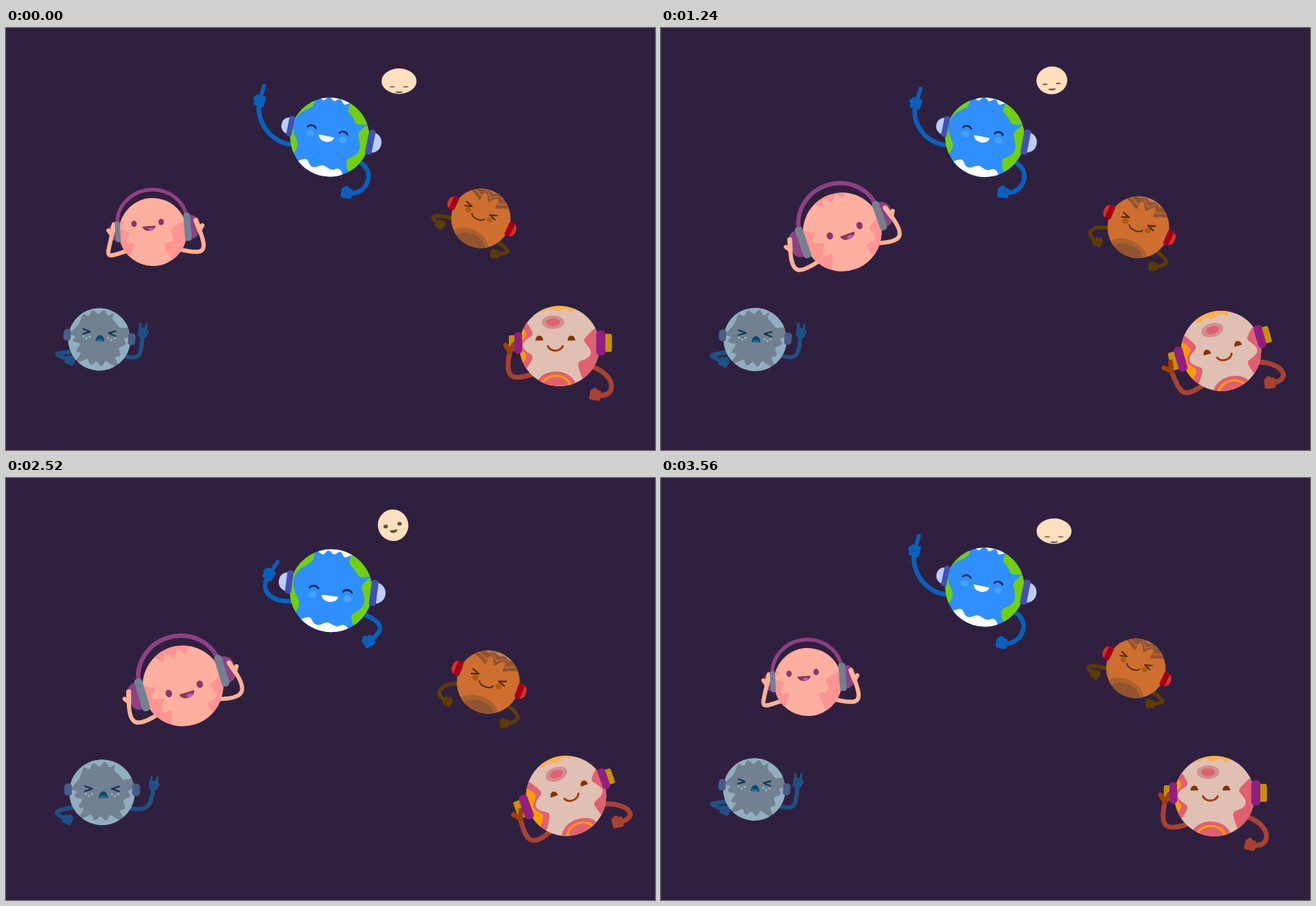
An HTML page with a canvas that plays this animation: 928 by 603 pixels, repeating every 3600 ms.

```html
<!DOCTYPE html>
<html lang="en">
<head>
<meta charset="utf-8">
<title>Dancing planets</title>
<style>
html, body { margin: 0; width: 100%; height: 100%; overflow: hidden; background: #302040; }
canvas { display: block; }
</style>
</head>
<body>
<canvas id="stage" width="928" height="603"></canvas>
<script>
const c = document.getElementById('stage').getContext('2d');
const { PI, sin, cos, min, max, abs, sqrt, exp } = Math;
const RAD = PI / 180;
c.lineCap = c.lineJoin = 'round';

// ---- Shapes ----
function fill(color, draw) { c.fillStyle = color; c.beginPath(); draw(); c.fill(); }
function stroke(color, width, draw) {
  c.strokeStyle = color; c.lineWidth = width; c.beginPath(); draw(); c.stroke();
}
function oval(color, x, y, rx, ry = rx, from = 0, to = 360) {
  fill(color, () => c.ellipse(x, y, rx, ry, 0, from * RAD, to * RAD));
}
function bar(color, x, y, w, h, r) { fill(color, () => c.roundRect(x, y, w, h, r)); }
function line(color, width, ...p) {
  stroke(color, width, () => { for (let i = 0; i < p.length; i += 2) c.lineTo(p[i], p[i + 1]); });
}
function within(x, y, angle, draw) {
  c.save(); c.translate(x, y); c.rotate(angle); draw(); c.restore();
}
function turn(x, y, degrees) {
  const s = sin(degrees * RAD), k = cos(degrees * RAD);
  return [x * k - y * s, x * s + y * k];
}

// A patch along the edge of the unit disc with a wavy inner border.
function rim(color, angle, half, depth, waves = 0, phase = 0) {
  fill(color, () => {
    c.arc(0, 0, 1.4, (angle - half) * RAD, (angle + half) * RAD);
    for (let u = 1; u > -1.01; u -= .05) {
      const r = 1 - depth * (1 + .4 * cos(waves * PI * u + phase)) * (1 - u ** 8);
      const a = (angle + half * u) * RAD;
      c.lineTo(r * cos(a), r * sin(a));
    }
  });
}

// ---- Hands, pointing along +x ----
function fist(color) {
  bar(color, -8, -7.5, 16, 15, 3);
  bar(color, -2, 3, 7, 7, 3);
}
const hands = {
  fist,
  point(color) { fist(color); line(color, 5.5, 4, 0, 22, 0); },
  horns(color) { fist(color); line(color, 4, 4, -5, 14, -5); line(color, 4, 4, 5, 14, 5); },
  touch(color) { line(color, 7, 0, 0, 15, 0); line(color, 6, 0, 0, 5, 6); },
  fork(color) { line(color, 7, 0, 0, 12, -4); line(color, 7, 0, 0, 8, 8); }
};

// ---- Face parts ----
function pair(dx, draw) {
  for (const side of [-1, 1]) { c.save(); c.translate(side * dx, 0); c.scale(side, 1); draw(); c.restore(); }
}
function squint(color, dx, size) {
  pair(dx, () => line(color, 2.5, size, -size * .7, -size, 0, size, size * .7));
}
function smile(color, y, rx, ry, width) {
  stroke(color, width, () => c.ellipse(0, y, rx, ry, 0, .08 * PI, .92 * PI));
}

// ---- Timing ----
const BEAT = 29;
const ease = u => (1 - cos(PI * max(0, min(1, u)))) / 2;
const lift = u => u * (1.4 - .4 * u);
// Swings from 1 to -1 in ten steps, waits, and is back at 1 when the beat ends.
const swing = (t, back) => 1 - 2 * (t < back ? ease(t / 10) : 1 - ease((t - back) / (BEAT - back)));

// pose(): body centre, radii, tilt, face offset, and for each hand x, y and direction.
const planets = [
  { // pink
    frames: 90, size: 60, ref: 1, rest: 6, pitch: .6, attached: true,
    body: '#ffaf9f', arm: '#ffb294', width: 6, reach: 34, shoulders: [148, 37], kinds: ['touch', 'touch'],
    cup: ['#8e4184', 21, 42, 16], pad: ['#738092', 12, 50], band: '#8e4184',
    pose(t) {
      const u = min(t, 89 - t) / 44.5, arc = sin(PI * u), e = lift(u), r = 48.5 + 9.5 * arc;
      const fx = -7.5 + 14 * e;
      return {
        x: 210 + 63 * e, y: 291.5 - 23 * e + 22 * arc, rx: r, ry: r, tilt: -4 - 22 * u,
        fx, fy: -13 - 4 * u + 21 * arc * arc,
        hands: [[-r * (1.4 + .025 * min(0, fx)), 0, -74], [r * (1.38 - .02 * max(0, fx)), 2, -107]]
      };
    },
    skin() {
      rim('#ff9494', -92, 28, .2, 2.4);
      rim('#ff9494', 160, 36, .28, 2.2);
      rim('#ff9494', 30, 30, .22, 1.5, 2);
    },
    face() {
      pair(24, () => oval('#85386f', 0, 0, 4.8, 5.6));
      oval('#8b3558', 2, 6, 11.5, 8.5, 0, 180);
      oval('#a467d2', 5, 11.5, 5, 2.5);
    }
  },
  { // blue
    frames: 30, size: 60, ref: 3, rest: 6, pitch: .25,
    body: '#308fff', arm: '#0862bd', width: 6.5, reach: 30, shoulders: [157, 29], kinds: ['point', 'fist'],
    cup: ['#bdcdfa', 17, 31, 15], pad: ['#4050b8', 10, 38],
    pose(t) {
      const w = swing(t, 15), h = swing(t, 10), bump = (1 - w * w) ** 1.5, r = 56.5 + 5 * bump;
      return {
        x: 467.5 - 4.5 * w, y: 156 + 9.5 * bump, rx: r, ry: r, tilt: 1.5 + 10 * w,
        fx: 3.2 - 6.2 * w, fy: -10 + 16 * bump,
        hands: [[-72 - 28 * h, 18 - 70 * h, -30 - 45 * w],
                [38 - 14 * w + 45 * bump, 62 + 18 * w, 190 - 80 * bump]]
      };
    },
    skin() {
      const green = '#70d010';
      rim(green, 190, 52, .17, 1.1, PI);
      rim(green, -45, 20, .17);
      rim(green, 13, 36, .16, 1.2, 2.6);
      rim('#fff', -90, 27, .11, 3);
      rim('#fff', 92, 34, .14, 2, 1);
    },
    face() {
      pair(25.5, () => oval('#48a0ff', 0, 10, 6, 5));
      pair(24.5, () => stroke('#102c50', 3, () => c.ellipse(0, 2, 6.5, 4.5, 0, 1.1 * PI, 1.9 * PI)));
      oval('#fff', 0, 9, 12, 9, 0, 180);
    }
  },
  { // grey
    frames: 30, size: 50, ref: 1, rest: 0, pitch: .2, small: .85,
    body: '#728191', arm: '#205184', width: 6, reach: 28, shoulders: [152, 30], kinds: ['fist', 'horns'],
    cup: ['#205184', 7, 15, 3], pad: ['#4b5d87', 11, 19],
    pose(t) {
      const v = t % (BEAT / 2), d = min(1, abs(v - 7.5) / 7.25), near = 1 - d;
      const squash = exp(-2 * (v - 7.8) ** 2), stretch = exp(-((v - 9.8) ** 2));
      return {
        x: 138.5 - 7 * cos(2 * PI * (t - 25.5) / BEAT), y: 445 + 57 * near ** 2.7,
        rx: 44.5 + 6 * near + 11 * squash - 8 * stretch,
        ry: 44.5 + 6 * near - 10 * squash + 6.5 * stretch,
        tilt: 4 - 10 * near, fx: 0, fy: -10 + 13 * near - 14 * squash + 5 * stretch,
        hands: [[-38 - 14 * cos(2 * PI * (t - 6) / BEAT), 30 + 24 * near + 6 * stretch, 25],
                [62 + 31 * near, -10 - 17 * squash, -85]]
      };
    },
    skin() {
      const pale = '#90aec0';
      rim(pale, -95, 35, .16, 3);
      rim(pale, -44, 20, .19);
      rim(pale, 210, 28, .15, 1);
      rim(pale, 158, 26, .26, 2);
      rim(pale, 22, 28, .2, 2);
      rim(pale, 92, 34, .17, 3);
    },
    face() {
      squint('#19354f', 20.5, 5.5);
      oval('#0d4a72', 2, 14, 7, 10, 180, 360);
      oval('#2470a0', 2, 12.5, 5, 1.8);
      pair(20, () => { for (const i of [-1, 0, 1]) oval('#9dc4d5', 5 * i, 11 - 3 * abs(i), 1.7, 1.3); });
    }
  },
  { // brown
    frames: 30, size: 46, ref: 1, rest: -4, pitch: .4, small: .8,
    body: '#ce6f30', arm: '#5c3c06', width: 5.5, reach: 25, shoulders: [155, 30], kinds: ['fist', 'fist'],
    cup: ['#d63026', 10, 21, 8], pad: ['#a30018', 9, 23],
    pose(t) {
      const s = sin(PI * t / BEAT), hop = s ** .4, r = 42.5 + 4 * hop;
      return {
        x: 679 + 33 * s, y: 272 + 31 * hop, rx: r, ry: r, tilt: 25 - 13.5 * s,
        fx: 2 * s, fy: -11 + 7 * hop,
        hands: [[-58, 9 + 30 * hop, 35 - 15 * hop], [20 + 9 * s, 51 + 13 * hop, 175]]
      };
    },
    skin() {
      const dark = '#92532f';
      rim(dark, -88, 50, .33, 3);
      rim('#ba6735', -88, 43, .24, 3);
      rim(dark, -88, 40, .19, 3);
      rim('#b58060', -88, 26, .09, 2);
      oval('#a9612f', 0, 1.02, .72, .5);
      oval(dark, .04, 1.06, .56, .4);
    },
    face() {
      pair(18, () => oval('#b35a08', 0, 7, 4.5, 4));
      squint('#54300c', 20.5, 5);
      smile('#54300c', 8, 11, 6.5, 2.2);
    }
  },
  { // cream
    frames: 45, size: 57.5, ref: -1, rest: -8, pitch: .3, attached: true,
    body: '#e0c0b2', arm: '#a84232', palm: '#a04008', width: 7, reach: 35,
    shoulders: [133, 33], kinds: ['fork', 'fist'],
    cup: ['#ca9000', 16, 26, 3], pad: ['#8f2082', 13, 36],
    pose(t) {
      const u = min(t, 44 - t) / 22, e = lift(u), dip = sin(PI * u) ** 2;
      return {
        x: 791.5 + 9.5 * ease(2 * u), y: 454.5 - 4 * u + 10 * dip, rx: 57.3, ry: 57.3, tilt: -23 * e,
        fx: -6 + 11 * e, fy: -11 - 2 * u + 9 * dip, open: dip > .45 && u < .43,
        hands: [[-71 - 6 * dip, 8, -78 - 20 * dip], [51 + 6 * u, 70 - 11 * u, 190]]
      };
    },
    skin() {
      const red = '#e06070', orange = '#ff9a08';
      rim('#ffb04c', -90, 26, .11, 2);
      oval('#d08f8f', -.1, -.58, .28, .17);
      oval(red, -.1, -.58, .17, .1);
      rim(red, 180, 38, .24, 1.5, PI);
      rim(orange, 180, 28, .14, 1.5, PI);
      rim(red, 14, 38, .23, 1.5, PI);
      [[red, .5], [orange, .39], [red, .32]].forEach(([color, r]) => oval(color, -.03, 1.03, r, r * .76));
    },
    face(p) {
      pair(23, () => oval('#843208', 0, 3, 5.5, 7, 180, 360));
      if (p.open) oval('#a04808', 1, 11, 7, 7);
      else smile('#a04008', 9, 11, 8.5, 3);
    }
  },
  { // little moon
    frames: 30, size: 22, ref: 0, rest: 0, pitch: 0, body: '#ffe0bd',
    pose(t) {
      const side = t < BEAT / 2 ? -1 : 1, up = sin(PI * min(1, t % (BEAT / 2) / 12));
      return {
        x: 562 + 12 * side * up, y: 76 - 17 * up * up, rx: 25 - 4 * sin(PI * up), ry: 18.2 + 6.2 * up,
        tilt: 18 * sin(-2 * PI * t / BEAT), fx: -up, fy: 8 - 11.5 * up
      };
    },
    skin() {},
    face(p) {
      const open = max(.7, (p.ry - 18) * .58);
      pair(10, () => oval('#5d5142', 0, 0, 2.7 + 1.2 / open, open));
      oval('#5d5142', 0, 7, 5.5, min(5, 1.5 + open), 0, 180);
    }
  }
];

function drawArm(planet, p, i) {
  const side = i ? 1 : -1, { arm, reach, small = 1 } = planet;
  const a = planet.shoulders[i] * RAD;
  const [sx, sy] = turn(cos(a) * p.rx * .94, sin(a) * p.ry * .94, p.tilt);
  const [ox, oy] = turn(reach * side, reach * sin(a) * .5, p.tilt);
  let [hx, hy, dir] = p.hands[i];
  if (planet.attached) { [hx, hy] = turn(hx, hy, p.tilt); dir += p.tilt; }
  const [dx, dy] = turn(reach, 0, dir);
  within(p.x, p.y, 0, () => {
    stroke(arm, planet.width, () => {
      c.moveTo(sx, sy);
      c.bezierCurveTo(sx + ox, sy + oy, hx - dx, hy - dy, hx, hy);
    });
    within(hx, hy, dir * RAD, () => {
      c.scale(small, i ? small : -small);
      hands[planet.kinds[i]](!i && planet.palm || arm);
    });
  });
}

function drawPlanet(planet, frame) {
  const t = frame % planet.frames % (planet.frames - 1);
  const p = planet.pose(t), { x, y, rx, ry, fx, fy } = p;
  const a = p.tilt * RAD, s = sqrt(rx * ry) / planet.size;
  const eachCup = draw => {
    for (const side of [-1, 1]) within(x, y, a, () => {
      const k = s * (1 - max(0, side * (fx - planet.ref)) * .03);
      c.translate(side * rx * 1.03, -ry * .08);
      c.scale(side * k, k);
      draw();
    });
  };
  if (planet.band) within(x, y, a, () => stroke(planet.band, 6.5 * s, () =>
    c.ellipse(0, -ry * .28, rx * 1.03, ry * .97, 0, PI, 2 * PI)));
  if (planet.cup) eachCup(() => {
    const [color, w, h, r] = planet.cup;
    bar(color, 0, -h / 2, w, h, [0, r, r, 0]);
  });
  if (p.hands) for (const i of [0, 1]) drawArm(planet, p, i);
  within(x, y, a, () => {
    oval(planet.body, 0, 0, rx, ry);
    c.clip();
    c.translate((fx - planet.ref) * .7, (fy - planet.rest) * planet.pitch);
    c.scale(rx, ry);
    planet.skin();
  });
  if (planet.pad) eachCup(() => {
    const [color, w, h] = planet.pad;
    bar(color, -w / 2, -h / 2, w, h, w * .4);
  });
  within(x + fx, y + fy, a, () => { c.scale(s, s); planet.face(p); });
}

function tick() {
  const frame = Math.floor(performance.now() / 40) % 90;
  c.fillStyle = '#302040';
  c.fillRect(0, 0, 928, 603);
  for (const planet of planets) drawPlanet(planet, frame);
  requestAnimationFrame(tick);
}
tick();
</script>
</body>
</html>
```
